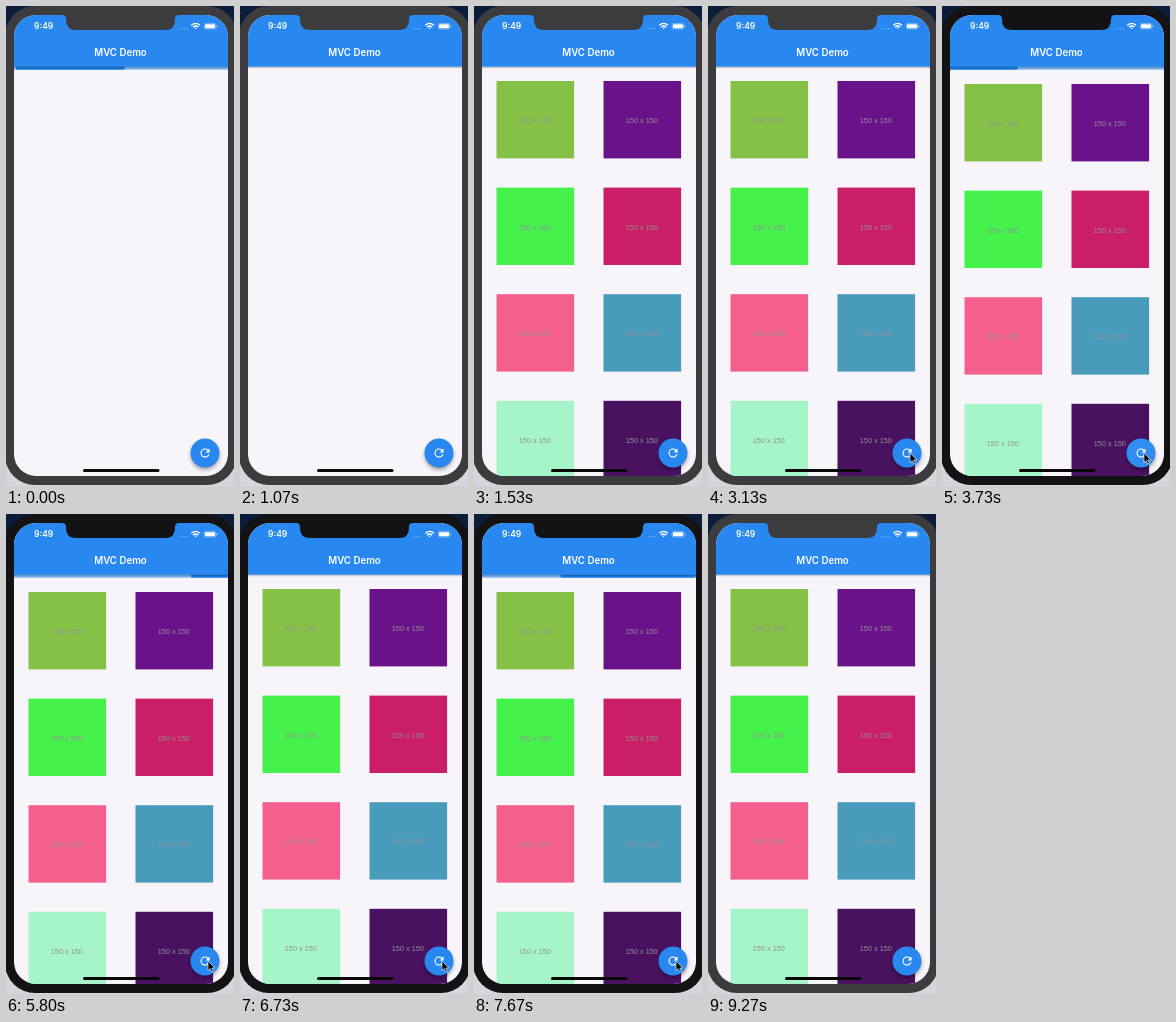
An HTML page for the animation above (9.47 s loop, 228x480 px).

```html
<!DOCTYPE html>
<html lang="en">
<head>
<meta charset="utf-8">
<title>MVC Demo</title>
<style>
  html, body { margin: 0; width: 100%; height: 100%; overflow: hidden; background: #d6d5dc; }
  svg { display: block; width: 100vw; height: 100vh; }
  .ui { font-family: Inter, Roboto, sans-serif; font-weight: 600; fill: #fff; }
  .label { font: 7.3px "Liberation Sans", Arial, sans-serif; fill: #929292; text-anchor: middle; }
</style>
</head>
<body>
<svg viewBox="0 0 228 480">
  <defs>
    <clipPath id="screen"><rect x="8" y="9" width="214" height="461" rx="22"/></clipPath>
    <linearGradient id="barShadow" x2="0" y2="1">
      <stop stop-color="#000" stop-opacity=".3"/>
      <stop offset="1" stop-color="#000" stop-opacity="0"/>
    </linearGradient>
    <filter id="soft" x="-50%" y="-50%" width="200%" height="200%"><feGaussianBlur stdDeviation="2"/></filter>
  </defs>

  <rect width="228" height="240" fill="#0b1d3a"/>
  <rect y="240" width="228" height="240" fill="#d6d5dc"/>
  <rect id="bezel" x="-1" y="0" width="232" height="479" rx="30"/>

  <g clip-path="url(#screen)">
    <rect x="8" y="9" width="214" height="461" fill="#f7f5fa"/>
    <g id="grid"></g>
    <g id="progress">
      <rect x="8" y="60" width="214" height="3.7" fill="#7fb7f3"/>
      <rect class="line" y="60" height="3.7" fill="#1f7ce0"/>
      <rect class="line" y="60" height="3.7" fill="#1f7ce0"/>
    </g>
    <rect x="8" y="60.5" width="214" height="2.5" fill="url(#barShadow)"/>
    <rect x="8" y="9" width="214" height="51.7" fill="#2888ef"/>
    <circle cx="199" cy="449.5" r="14" opacity=".4" filter="url(#soft)"/>
    <circle cx="199" cy="447" r="14.5" fill="#2888ef"/>
    <circle id="splash" cx="199" cy="447" r="14.5" fill="#fff"/>
    <path transform="translate(192.2 440.2) scale(.57)" fill="#fff"
      d="M17.65 6.35A8 8 0 1 0 19.73 14h-2.08A6 6 0 1 1 12 6c1.66 0 3.14.69 4.22 1.78L13 11h7V4z"/>
    <rect x="77" y="463" width="76.500" height="3" rx="1.5" fill="#08080a"/>
  </g>

  <path id="notch" d="M56 8V9Q60 9 60 13V14Q60 24 70 24H159Q169 24 169 14V13Q169 9 173 9V8Z"/>
  <text class="ui" x="28" y="23.300" font-size="8.500">9:49</text>
  <text class="ui" x="114.500" y="49.500" font-size="9.700" text-anchor="middle">MVC Demo</text>
  <g fill="#fff" opacity=".4">
    <circle cx="174" cy="22.700" r=".6"/><circle cx="176.300" cy="22.700" r=".6"/>
    <circle cx="178.600" cy="22.700" r=".6"/><circle cx="180.900" cy="22.700" r=".6"/>
  </g>
  <g fill="none" stroke="#fff" stroke-width="1.400">
    <path d="M185.300 19.200Q189.600 15.600 193.900 19.200M187 21.100Q189.600 19 192.200 21.100"/>
    <path d="M188.300 21.700H190.900L189.600 23.200Z" fill="#fff" stroke="none"/>
    <rect x="198.200" y="17.400" width="11.600" height="5.600" rx="1.600" stroke-width=".6" opacity=".6"/>
  </g>
  <rect x="199" y="18.200" width="10" height="4" rx=".9" fill="#fff"/>
  <rect x="210.300" y="19.200" width="1" height="2" rx=".5" fill="#fff" opacity=".6"/>
  <path id="cursor" d="M0 0V9.600L2.200 7.600L3.700 11L5.300 10.300L3.800 7H6.800Z" fill="#000" stroke="#fff" stroke-width=".6"/>
</svg>

<script>
const LOOP = 9470, FRAME = 1000 / 15;
const $ = id => document.getElementById(id);
const colors = ['#86c147', '#6a128a', '#44f24b', '#ca1e69', '#f55f8b', '#499bbb', '#a5f5c9', '#481260'];

// Each load: visible from, visible until, start of its animation
const loads = [[0, 600, -385], [3470, 4600, 3470], [4800, 5870, 4800], [5930, 6680, 5930], [6930, 8000, 6930]];
const IMAGES_READY = 1530, FOCUS = 3400, BLUR = 9100;
const cursorPath = [[2000, 214, 477], [2200, 211, 471], [2400, 210, 469], [2730, 202, 448],
  [3130, 202, 447], [9040, 202, 447], [9200, 212, 478]];

$('grid').innerHTML = colors.map((color, i) => {
  const x = 22.5 + i % 2 * 107, y = 75 + (i >> 1) * 106.6;
  return `<rect x="${x}" y="${y}" width="77.6" height="77.4" fill="${color}"/>
    <text class="label" x="${x + 38.3}" y="${y + 42}">150 x 150</text>`;
}).join('');

const clamp = v => Math.min(1, Math.max(0, v));

// Cubic Bézier easing with y control points 0 and 1
function ease(x, x1, x2, y1 = 0, y2 = 1) {
  const curve = (s, a, b) => 3 * a * s * (1 - s) ** 2 + 3 * b * s * s * (1 - s) + s ** 3;
  let low = 0, high = 1;
  for (let i = 0; i < 20; i++) {
    const mid = (low + high) / 2;
    if (curve(mid, x1, x2) < x) low = mid; else high = mid;
  }
  return curve(low, y1, y2);
}

const lines = document.querySelectorAll('.line');
function drawProgress(ms) {
  const phase = ms % 1800;
  const at = (start, length, x1, x2) => ease(clamp((phase - start) / length), x1, x2);
  const spans = [
    [at(333, 750, .4, 1), at(0, 750, .2, .8)],
    [at(1267, 533, .1, .45), at(1000, 567, 0, .65)]
  ];
  spans.forEach(([tail, head], i) => {
    lines[i].setAttribute('x', 8 + 214 * tail);
    lines[i].setAttribute('width', 214 * Math.max(0, head - tail));
  });
}

function cursorAt(t) {
  const i = cursorPath.findIndex(p => p[0] > t);
  if (i < 1) return null;
  const [t0, x0, y0] = cursorPath[i - 1], [t1, x1, y1] = cursorPath[i];
  const k = (t - t0) / (t1 - t0);
  return [x0 + (x1 - x0) * k, y0 + (y1 - y0) * k];
}

const show = (el, on) => { el.style.visibility = on ? 'visible' : 'hidden'; };

function render(t) {
  const tick = Math.floor((t + 4) / FRAME) * FRAME;
  const load = loads.find(([from, to]) => t >= from && t < to);
  show($('progress'), load);
  if (load) drawProgress(Math.max(0, tick - load[2]));
  show($('grid'), t >= IMAGES_READY);
  $('grid').setAttribute('transform', `translate(0 ${load ? 3 : 0})`);

  const shell = t >= FOCUS && t < BLUR ? '#131214' : '#3c3b3e';
  $('bezel').setAttribute('fill', shell);
  $('notch').setAttribute('fill', shell);

  const press = loads.slice(1).map(l => tick - l[0]).find(d => d >= 0 && d < 450);
  $('splash').setAttribute('opacity', press === undefined ? 0 : .1 * (1 - press / 450));

  const point = cursorAt(tick);
  show($('cursor'), point);
  if (point) $('cursor').setAttribute('transform', `translate(${point})`);
}

function play(now) {
  render(now % LOOP);
  requestAnimationFrame(play);
}
render(0);
requestAnimationFrame(() => {
  const start = performance.now();
  const loop = () => { play.time = performance.now() - start; render(play.time % LOOP); requestAnimationFrame(loop); };
  loop();
});
</script>
</body>
</html>
```
